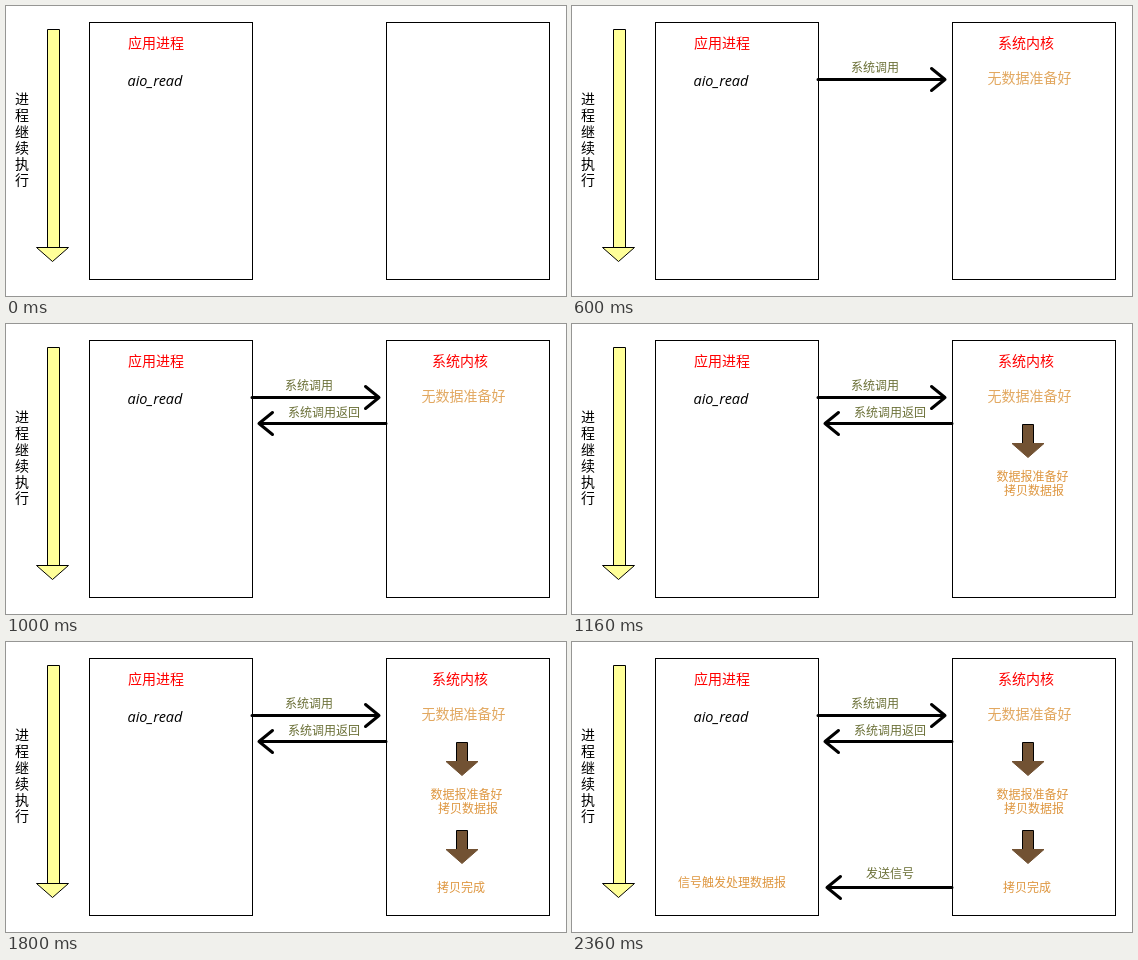
Recreate the animation shown at these times as an HTML page with a canvas. Size 560 by 290 pixels, loop 2400 ms.

```html
<!DOCTYPE html>
<html lang="zh-CN">
<head>
<meta charset="utf-8">
<title>异步 I/O</title>
<style>
html, body { margin: 0; width: 100%; height: 100%; overflow: hidden; background: #fff; }
canvas { display: block; }
</style>
</head>
<body>
<canvas id="stage" width="560" height="290"></canvas>
<script>
const ctx = document.getElementById('stage').getContext('2d');
const LOOP = 2400, FIRST = 360, STEP = 400;
const BLACK = '#000', RED = '#f00', YELLOW = '#ff9', BROWN = '#725233';
const OLIVE = '#6b7037', ORANGE = '#de963f', PALE = '#e2a860';
const BIG = 14, SMALL = 12;

// Centres text on (x, y)
function label(text, x, y, size, color) {
  ctx.font = `300 ${size}px "Noto Sans CJK SC", "Noto Sans CJK", sans-serif`;
  ctx.textAlign = 'center';
  ctx.fillStyle = color;
  ctx.fillText(text, x, y + size * 0.38);
}

function polygon(points, fill, line) {
  ctx.beginPath();
  points.forEach(([x, y]) => ctx.lineTo(x, y));
  ctx.closePath();
  ctx.fillStyle = fill;
  ctx.fill();
  ctx.lineWidth = 1;
  ctx.strokeStyle = line;
  ctx.stroke();
}

function box(x) {
  ctx.lineWidth = 1;
  ctx.strokeStyle = BLACK;
  ctx.strokeRect(x + 0.5, 16.5, 163, 257);
}

// Horizontal arrow whose wings point back towards its start
function callArrow(from, to, y) {
  const back = to - 13.5 * Math.sign(to - from);
  ctx.save();
  ctx.lineCap = ctx.lineJoin = 'round';
  ctx.lineWidth = 3;
  ctx.strokeStyle = BLACK;
  ctx.beginPath();
  ctx.moveTo(from, y);
  ctx.lineTo(to, y);
  ctx.moveTo(back, y - 11);
  ctx.lineTo(to, y);
  ctx.lineTo(back, y + 11);
  ctx.stroke();
  ctx.restore();
}

// Downward arrow: a shaft of the given width with a 32 px wide head
function blockArrow(shaft, width, head, top, neck, fill, headLine) {
  const right = shaft + width;
  polygon([[shaft, top], [right, top], [right, neck], [shaft, neck]], fill, BLACK);
  polygon([[head, neck], [head + 32, neck], [head + 16, neck + 14]], fill, headLine);
}

function stepArrow(y) {
  blockArrow(450.5, 11, 440, y + 0.5, y + 19.5, BROWN, BROWN);
}

function base() {
  box(83);
  box(380);
  blockArrow(41.5, 12, 30.5, 23.5, 241.5, YELLOW, BLACK);
  [...'进程继续执行'].forEach((c, i) => label(c, 16, 93 + i * 16.1, BIG, BLACK));
  label('应用进程', 150, 37, BIG, RED);
  ctx.font = 'italic 14.5px "Open Sans", sans-serif';
  ctx.textAlign = 'left';
  ctx.fillStyle = BLACK;
  ctx.fillText('aio_read', 121.5, 80);
}

const steps = [
  () => {
    callArrow(246, 373, 73.5);
    label('系统调用', 303, 61.5, SMALL, OLIVE);
    label('系统内核', 454, 37, BIG, RED);
    label('无数据准备好', 457.5, 72, BIG, PALE);
  },
  () => {
    callArrow(380, 253, 99.5);
    label('系统调用返回', 318, 88, SMALL, OLIVE);
  },
  () => {
    stepArrow(100);
    label('数据报准备好', 460.5, 152, SMALL, ORANGE);
    label('拷贝数据报', 462, 166.5, SMALL, ORANGE);
  },
  () => {
    stepArrow(188);
    label('拷贝完成', 455, 245.5, SMALL, ORANGE);
  },
  () => {
    callArrow(380, 255, 245.5);
    label('发送信号', 318, 231.5, SMALL, OLIVE);
  },
  () => label('信号触发处理数据报', 160, 240.5, SMALL, ORANGE)
];

function draw(t) {
  ctx.fillStyle = '#fff';
  ctx.fillRect(0, 0, 560, 290);
  base();
  steps.forEach((paint, i) => {
    if (t >= FIRST + i * STEP) paint();
  });
}

const origin = performance.now();
function tick() {
  draw((performance.now() - origin) % LOOP);
  requestAnimationFrame(tick);
}
tick();
</script>
</body>
</html>
```
